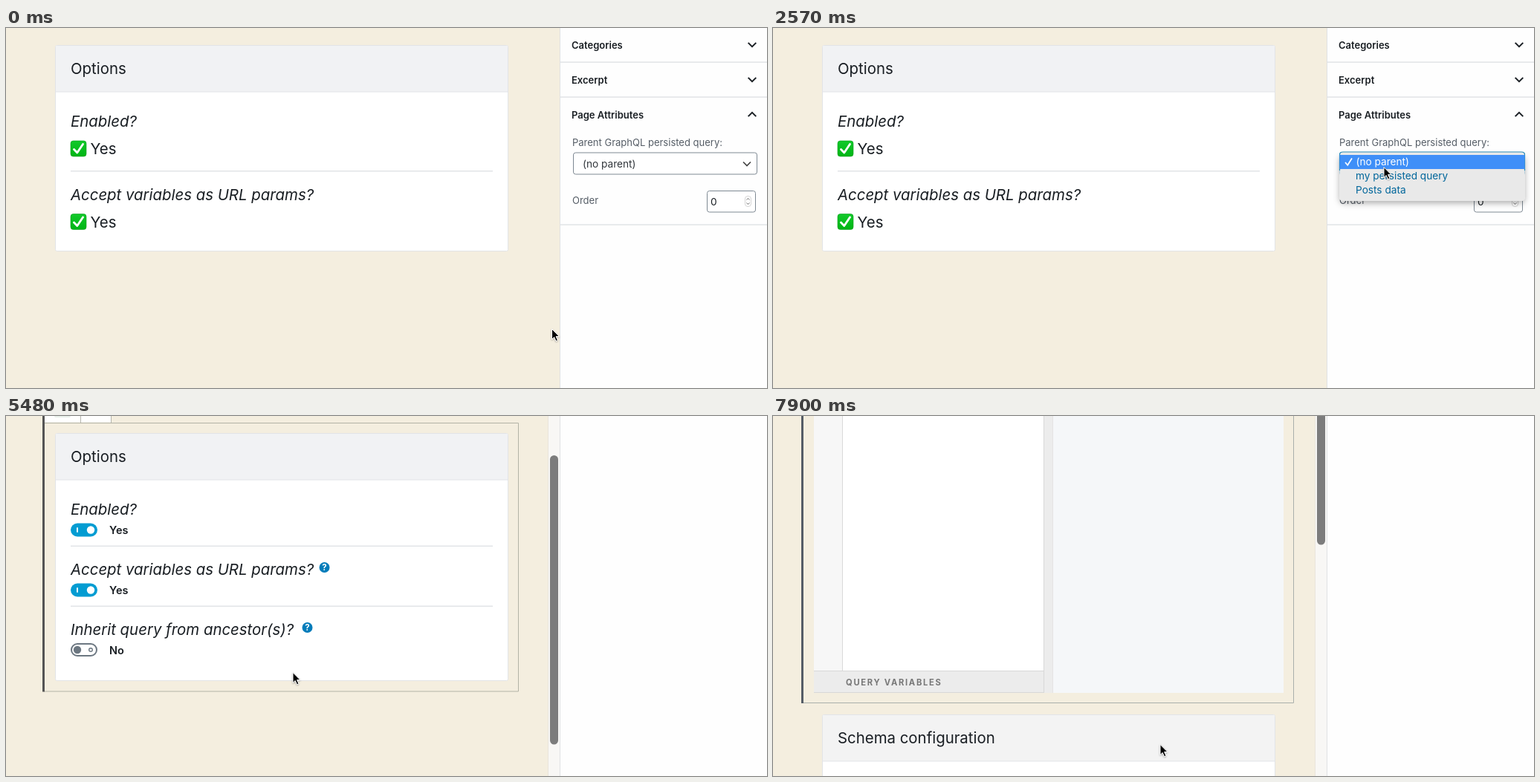
Animation of 1024 by 485 pixels, one loop 8000 ms. Source, as an HTML page:

```html
<!DOCTYPE html>
<html lang="en">
<head>
<meta charset="utf-8">
<title>Query options</title>
<style>
  html, body { margin: 0; width: 100%; height: 100%; overflow: hidden; background: #f4eedf; }
  svg { display: block; width: 1024px; height: 485px; }
  text { font: 13px Inter, "Open Sans", sans-serif; font-optical-sizing: none; fill: #191e23; white-space: pre; }
  .big { font-size: 20.4px; }
  .ask { font-size: 20.4px; font-style: italic; }
  .head { font-weight: 600; }
  .label { fill: #555d66; }
  .item { font-size: 13.65px; }
  .state { font-size: 14.5px; font-weight: 600; }
  .caps { font-size: 11.2px; font-weight: 700; letter-spacing: 1.7px; fill: #777; }
  .help { font-size: 11.5px; font-weight: 700; fill: #fff; text-anchor: middle; }
</style>
</head>
<body>
<svg id="stage" viewBox="0 0 1024 485"></svg>
<script>
const LOOP = 8000;
const CLICK_EDIT = 5480, CLICK_TOGGLE = 6740, SCROLL = 7750, OUTLINE = 7900;
const MENU_OPEN = 2400, MENU_CLOSE = 3640, PICKED = 3725, TRACK = 4230;

const rect = (x, y, w, h, fill, more = '') =>
  `<rect x="${x}" y="${y}" width="${w}" height="${h}" fill="${fill}" ${more}/>`;
const text = (x, y, cls, str, more = '') => `<text x="${x}" y="${y}" class="${cls}" ${more}>${str}</text>`;
const line = (d, color, width = 1, more = '') =>
  `<path d="${d}" fill="none" stroke="${color}" stroke-width="${width}" ${more}/>`;
const group = (id, body) => `<g id="${id}">${body}</g>`;
const divider = y => rect(87, y, 568, 1.5, '#e2e4e7');

// White card with a tinted header
const card = (id, y, h, title, tint) =>
  rect(66.5, y + .5, 609, h - 1, '#fff', `id="${id}" rx="2" stroke="#e2e4e7"`) +
  rect(67, y + 1, 608, 62, tint) + rect(67, y + 62.5, 608, 1, '#e2e4e7') +
  text(87, y + 39, 'big', title);

const tick = y =>
  rect(87, y, 21, 21, 'url(#green)', 'rx="3.5" stroke="#0a9a1c" stroke-width=".6"') +
  line(`M91.5 ${y + 11.5}L95.8 ${y + 16}L103.5 ${y + 4.5}`, '#fff', 2.8, 'stroke-linecap="round" stroke-linejoin="round"');
const cross = y => line(`M89 ${y + 2}L106 ${y + 18.5}M106 ${y + 2}L89 ${y + 18.5}`, '#ee1111', 4.6);

const toggleOn = y =>
  rect(87, y - 9, 36, 18, '#039cd2', 'rx="9"') + rect(95, y - 3.2, 2, 6.4, '#fff') +
  `<circle cx="114" cy="${y}" r="5.2" fill="#fff"/>`;
const toggleOff = y =>
  rect(88, y - 8, 34, 16, '#fff', 'rx="8" stroke="#6c7781" stroke-width="2"') +
  `<circle cx="96" cy="${y}" r="5.2" fill="#6c7781"/>` +
  `<circle cx="114" cy="${y}" r="2.3" fill="none" stroke="#6c7781" stroke-width="1.4"/>`;
const help = (x, y) => `<circle cx="${x}" cy="${y}" r="7" fill="#007cba"/>` + text(x, y + 4.1, 'help', '?');

const chevron = (x, y, s, up, color, w) =>
  line(`M${x - s} ${y - up * s / 2}L${x} ${y + up * s / 2}L${x + s} ${y - up * s / 2}`, color, w);

const preview = group('preview',
  card('box', 23, 278, 'Options', '#f1f2f4') +
  text(87, 133, 'ask', 'Enabled?') + tick(152) + text(113.5, 170, 'big', 'Yes') +
  divider(192) +
  text(87, 231.5, 'ask', 'Accept variables as URL params?') + tick(250.5) + text(113.5, 268.5, 'big', 'Yes') +
  group('inherit', divider(291) + text(87, 330, 'ask', 'Inherit query from ancestor(s)?') +
    cross(350) + text(113.5, 367.5, 'big', 'No')));

const editor = group('editor',
  rect(52, -2, 89, 10.5, '#fff') + rect(65, -6, 22, 8, '#e9f0ea', 'rx="2"') +
  line('M100.5 0V9M141.5 0V9', '#b4b4ac') +
  line('M51 9.5H689.5V371H51', '#b3b3a6') + rect(49, 0, 3, 371.5, '#555') +
  card('form', 23, 334, 'Options', '#f1f2f4') +
  text(87, 133, 'ask', 'Enabled?') + toggleOn(153.5) + text(139, 159, 'state', 'Yes') +
  divider(174.5) +
  text(87, 213.5, 'ask', 'Accept variables as URL params?') + help(428.5, 204) +
  toggleOn(234.5) + text(139, 240, 'state', 'Yes') +
  divider(255.5) +
  text(87, 294.5, 'ask', 'Inherit query from ancestor(s)?') + help(405.5, 285) +
  group('off', toggleOff(315) + text(139, 321, 'state', 'No')) +
  group('on', toggleOn(315) + text(139, 321, 'state', 'Yes')));

const client = group('client',
  rect(55, 0, 38.5, 343, '#f7f7f7') + rect(93, 0, 1, 343, '#d9d9d9') + rect(94, 0, 270, 343, '#fff') +
  rect(364, 0, 13, 373, '#ececec') + rect(376, 0, 1, 373, '#e4e4e4') + rect(377, 0, 310, 373, '#f5f7f9') +
  rect(55, 343, 309, 30, '#ececec') + line('M55 343.5H364M55 372.5H364.5M364.5 0V373', '#d8d8d8') +
  text(98, 362.5, 'caps', 'QUERY VARIABLES') +
  card('schema', 402, 140, 'Schema configuration', '#f3f3f3') +
  group('outline', line('M700.5 0V386.5H40', '#a9afab') + rect(38, 0, 3, 387, '#555d66')));

const panel = group('panel',
  [46, 93, 265].map(y => rect(746, y - .7, 278, 1.5, '#e2e4e7')).join('') +
  text(761, 27.5, 'head', 'Categories') + chevron(1004, 22.5, 5.3, 1, '#191e23', 2) +
  text(761, 74.5, 'head', 'Excerpt') + chevron(1004, 69.5, 5.3, 1, '#191e23', 2) +
  text(761, 121.5, 'head', 'Page Attributes') + chevron(1004, 116.5, 5.3, -1, '#191e23', 2) +
  text(762, 158.5, 'label', 'Parent GraphQL persisted query:') +
  rect(763.5, 168, 247, 29, '#fff', 'id="select" rx="3"') +
  text(776, 188, 'item', '', 'id="chosen"') + chevron(997, 183, 5, 1, '#444', 1.7) +
  text(762, 236.5, 'label', 'Order') +
  rect(943.5, 219.5, 65, 28.5, '#fff', 'rx="3" stroke="#7e8993"') + text(948, 239, 'item', '0') +
  rect(994.5, 226.5, 8, 14, '#fff', 'rx="3.5" stroke="#d5d5d5"') +
  chevron(998.5, 230.5, 2, -1, '#666', 1) + chevron(998.5, 236.5, 2, 1, '#666', 1));

const menu = group('menu',
  rect(762.5, 170, 249, 63, '#e8e8e8', 'rx="5" filter="url(#soft)"') +
  rect(762.5, 167, 249, 66, '#e9e9e9', 'rx="4"') +
  line('M762.5 192V171Q762.5 167 767 167H1007Q1011.5 167 1011.5 171V192', '#2b8db8', 1.2) +
  rect(762.5, 171, 249, 19, '#3f8ff8', 'id="bar"') +
  line('M770 181L773.2 184.8L779 175.5', '#fff', 1.7, 'id="mark"') +
  text(784.5, 185.3, 'item', '(no parent)', 'id="row0"') +
  text(784, 204.2, 'item', 'my persisted query', 'id="row1"') +
  text(784, 223, 'item', 'Posts data', 'fill="#00669b" style="fill:#00669b"'));

const beamPath = 'M-2.5 -7.5Q0 -7.5 0 -5.5Q0 -7.5 2.5 -7.5M0 -5.5V6.5M-2.5 8.5Q0 8.5 0 6.5Q0 8.5 2.5 8.5M-1.5 3.5H1.5';
const pointer = group('pointer',
  group('arrow', '<path d="M0 0V14L3.2 11L5.5 16.3L7.9 15.2L5.6 10.1H10Z" fill="#000" stroke="#fff" stroke-width="1" filter="url(#drop)"/>') +
  group('beam', line(beamPath, '#fff', 2.4, 'opacity=".7"') + line(beamPath, '#111', 1.1)));

const stage = document.getElementById('stage');
stage.innerHTML = `<defs>
  <linearGradient id="green" x2="0" y2="1"><stop stop-color="#12c92a"/><stop offset="1" stop-color="#00b515"/></linearGradient>
  <filter id="soft" x="-10%" y="-30%" width="120%" height="170%"><feDropShadow dx="0" dy="3" stdDeviation="4" flood-opacity=".32"/></filter>
  <filter id="drop" x="-40%" y="-30%" width="200%" height="180%"><feDropShadow dx="0" dy="1" stdDeviation=".8" flood-opacity=".35"/></filter>
  </defs>` +
  rect(0, 0, 1024, 485, '#f4eedf') + preview + editor + client +
  group('track', rect(729, 0, 16, 485, '#f8f7f5') + rect(729, 0, 1, 485, '#e9e5dc')) +
  rect(732, 44, 11, 382, '#7c7c7c', 'id="thumb" rx="5.5"') +
  rect(746, 0, 278, 485, '#fefefe') + rect(745, 0, 1, 485, '#e0e2e4') +
  panel + menu + pointer;

const $ = id => document.getElementById(id);
const show = (id, on) => $(id).style.display = on ? '' : 'none';
const set = (id, attrs) => { for (const k in attrs) $(id).setAttribute(k, attrs[k]); };

// Pointer moves: first step, last step, number of steps, target x and y
const START = [734.5, 405.5];
const MOVES = [
  [90, 440, 5, 723, 464], [530, 700, 3, 722, 432],
  [1520, 1700, 3, 855, 277], [1870, 2220, 5, 822, 187.5],
  [2920, 3100, 3, 821, 201], [4140, 4330, 3, 559, 365.5],
  [4410, 4940, 7, 386, 345.5], [5870, 6300, 6, 95, 317],
  [6830, 7180, 5, 521, 442.5]
];
const ease = p => p * (2 - p);

function pointerAt(t) {
  let [x, y] = START;
  for (const [from, to, n, tx, ty] of MOVES) {
    if (t < from) break;
    const step = Math.min(n, 1 + Math.floor((t - from) / (to - from) * (n - 1) + .001));
    const p = ease(step / n);
    x += (tx - x) * p;
    y += (ty - y) * p;
  }
  return [x, y];
}

function draw(t) {
  const picked = t >= PICKED, editing = t >= CLICK_EDIT, scrolled = t >= SCROLL;

  show('preview', !editing);
  show('inherit', picked);
  set('box', { height: picked ? 376 : 277 });
  show('editor', editing && !scrolled);
  show('off', t < CLICK_TOGGLE);
  show('on', t >= CLICK_TOGGLE);
  show('client', scrolled);
  show('outline', t >= OUTLINE);

  const wide = t >= TRACK;
  show('track', wide);
  show('thumb', picked);
  set('thumb', {
    x: wide ? 732 : 735, width: wide ? 11 : 7, rx: wide ? 5.5 : 3.5,
    y: scrolled ? -216 : editing ? 53 : 44, height: editing ? 389.5 : 382
  });

  show('panel', !editing);
  const focus = t >= MENU_OPEN;
  set('select', focus
    ? { x: 763, y: 168, width: 248, height: 29.5, stroke: '#007cba', 'stroke-width': 2 }
    : { x: 763.5, y: 168, width: 247, height: 29, stroke: '#7e8993', 'stroke-width': 1 });
  $('chosen').textContent = picked ? 'my persisted query' : '(no parent)';
  $('chosen').style.fill = focus ? '#00669b' : '#32373c';

  show('menu', t >= MENU_OPEN && !picked);
  $('menu').style.opacity = t >= MENU_CLOSE ? .5 : 1;
  const second = t >= 3010;
  set('bar', { y: second ? 190 : 171 });
  set('mark', { stroke: second ? '#00669b' : '#fff' });
  $('row0').style.fill = second ? '#00669b' : '#fff';
  $('row1').style.fill = second ? '#fff' : '#00669b';

  const [x, y] = pointerAt(t);
  set('pointer', { transform: `translate(${x.toFixed(1)} ${y.toFixed(1)})` });
  const lateBeam = t >= 7180 && t < 7540;
  show('beam', t >= 1070 && t < 1520 || lateBeam);
  show('arrow', !(t >= 1170 && t < 1520 || lateBeam));
}

const begin = performance.now();
function tickFrame() {
  draw((performance.now() - begin) % LOOP);
  requestAnimationFrame(tickFrame);
}
tickFrame();
</script>
</body>
</html>
```
